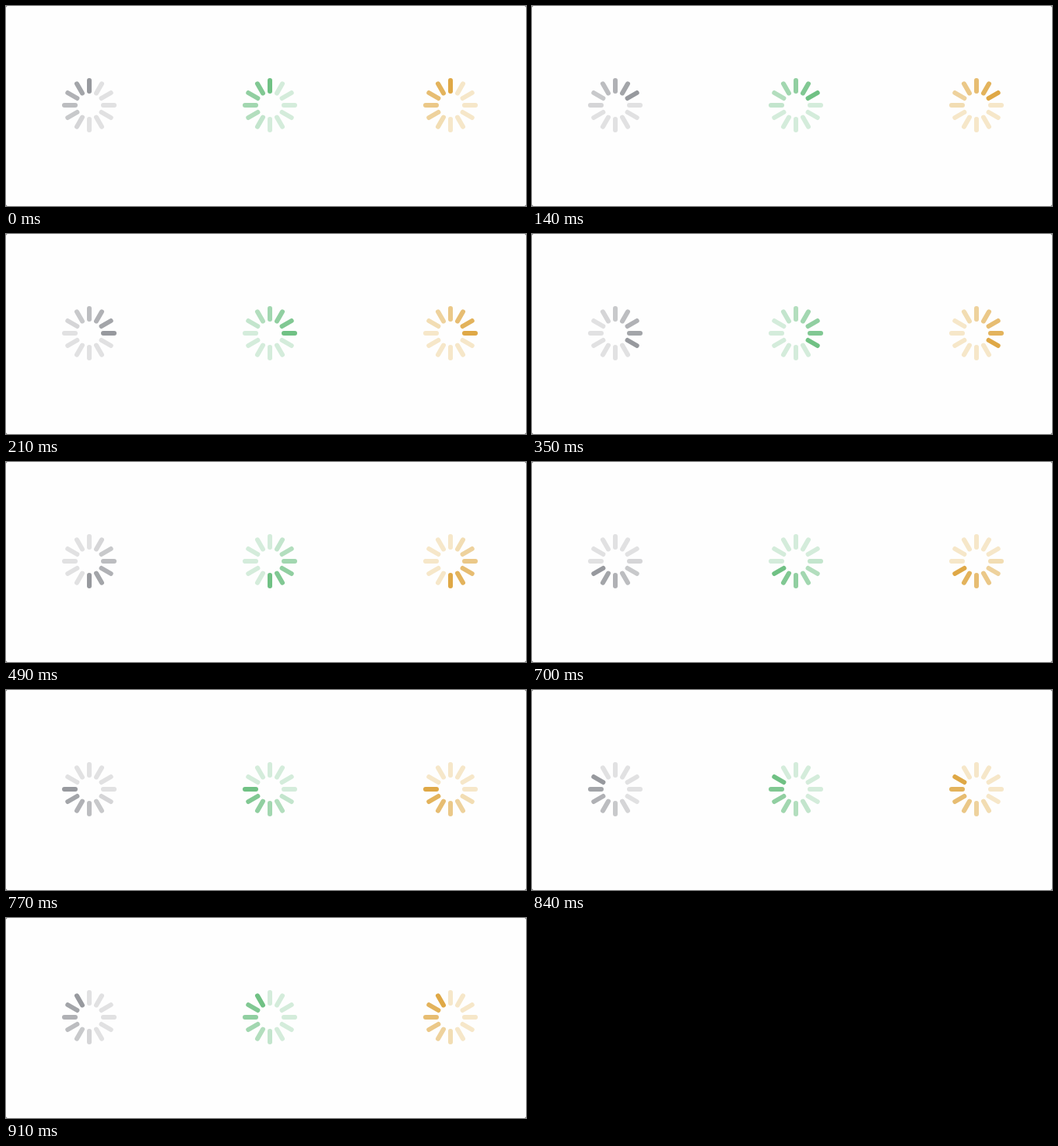
Recreate the animation shown at these times as an HTML page. Size 668 by 258 pixels, loop 980 ms.

```html
<!DOCTYPE html>
<html lang="en">
<head>
<meta charset="utf-8">
<title>Activity indicators</title>
<style>
  html, body { margin: 0; width: 100%; height: 100%; overflow: hidden; background: #4a4a4a; }
  svg { display: block; width: 668px; height: 258px; background: #fefefe; border-radius: 2px; }
  line { stroke-width: 6; stroke-linecap: round; }
</style>
</head>
<body>
<svg id="stage" viewBox="0 0 668 258"></svg>
<script>
const SPOKES = 12, FADE = 6, TICK = 70;
// Leading spoke at each tick; two ticks hold
const HEADS = [0, 1, 2, 3, 3, 4, 5, 6, 7, 7, 8, 9, 10, 11];
const SPINNERS = [
  { x: 107, dark: [151, 153, 158], light: [225, 225, 226] },
  { x: 339, dark: [112, 193, 132], light: [212, 236, 219] },
  { x: 571, dark: [223, 168, 70], light: [246, 231, 201] }
];
const stage = document.getElementById('stage');

function addSpoke(x, index) {
  const line = document.createElementNS('http://www.w3.org/2000/svg', 'line');
  const attrs = { y1: -18, y2: -32, transform: `translate(${x} 128) rotate(${index * 360 / SPOKES})` };
  for (const key in attrs) line.setAttribute(key, attrs[key]);
  return stage.appendChild(line);
}

function shade({ dark, light }, age) {
  const k = Math.min(age / FADE, 1);
  return `rgb(${dark.map((d, i) => Math.round(d + (light[i] - d) * k))})`;
}

for (const s of SPINNERS) {
  s.spokes = Array.from({ length: SPOKES }, (_, i) => addSpoke(s.x, i));
  s.shades = Array.from({ length: SPOKES }, (_, age) => shade(s, age));
}

let shown = -1;
function draw(now) {
  const head = HEADS[Math.floor(now / TICK) % HEADS.length];
  if (head === shown) return;
  shown = head;
  for (const { spokes, shades } of SPINNERS) {
    spokes.forEach((spoke, i) => spoke.setAttribute('stroke', shades[(head - i + SPOKES) % SPOKES]));
  }
}

const start = performance.now();
function loop(now) {
  draw(Math.max(0, now - start));
  requestAnimationFrame(loop);
}
draw(0);
requestAnimationFrame(loop);
</script>
</body>
</html>
```
